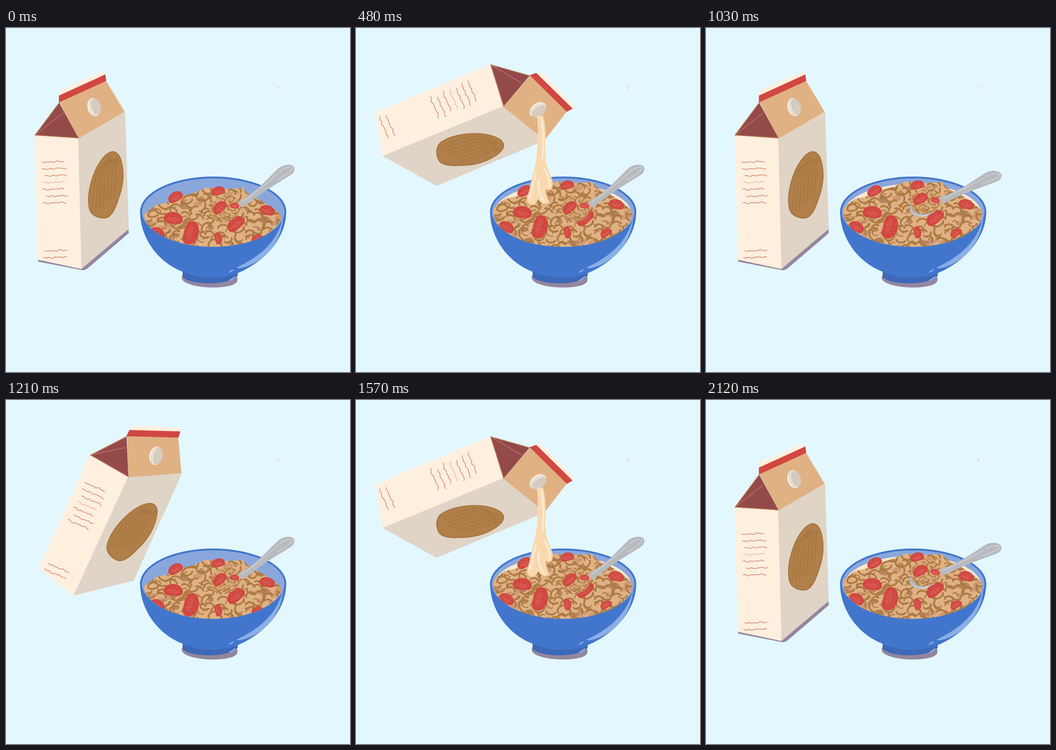
Write an HTML page that moves like this. It is 748x748 px and loops after 2180 ms.

```html
<!DOCTYPE html>
<html lang="en">
<head>
<meta charset="utf-8">
<title>Breakfast</title>
<style>
html, body { margin: 0; width: 100%; height: 100%; overflow: hidden; background: #e3f7ff; }
svg { display: block; width: 100vw; height: 100vh; }
</style>
</head>
<body>
<svg id="stage" viewBox="0 0 748 748" stroke-linecap="round" stroke-linejoin="round"></svg>
<script>
let seed = 11;
const rand = (lo = 0, hi = 1) => {
  seed = (seed * 16807) % 2147483647;
  return lo + (hi - lo) * seed / 2147483647;
};
const clamp = (v, lo = 0, hi = 1) => Math.min(hi, Math.max(lo, v));
const repeat = (count, make) => Array.from({ length: count }, (_, i) => make(i)).join('');
const shape = (d, fill, extra = '') => `<path d="${d}" fill="${fill}" ${extra}/>`;
const line = (d, color, width, extra = '') =>
  `<path d="${d}" fill="none" stroke="${color}" stroke-width="${width}" ${extra}/>`;
const oval = (x, y, rx, ry, turn, fill, extra = '') =>
  `<ellipse cx="${x}" cy="${y}" rx="${rx}" ry="${ry}" transform="rotate(${turn} ${x} ${y})" fill="${fill}" ${extra}/>`;

function scribble(row) {
  const left = rand(78, 90), width = rand(46, 56), phase = rand(0, 6), y = 291 + row * 14.85;
  const points = Array.from({ length: width / 2 }, (_, i) =>
    `${(left + i * 2).toFixed(1)} ${(y + 1.5 * Math.sin(i * 0.85) * Math.sin(i / 5 + phase) + Math.sin(i / 4)).toFixed(1)}`);
  return line('M' + points.join('L'), '#c4563f', 1.2, `opacity="${row === 3 ? 0.45 : 0.85}"`);
}

// Curled strokes on a jittered grid
function curls(x1, y1, x2, y2, step, size) {
  let d = '';
  for (let y = y1; y < y2; y += step * 0.7) {
    for (let x = x1; x < x2; x += step) {
      const a = rand(-0.9, 0.9), r = size * rand(0.7, 1.2);
      const bend = rand(0.3, 0.8) * (rand() < 0.5 ? -r : r);
      const cx = x + rand(-0.4, 0.4) * step, cy = y + rand(-0.3, 0.3) * step;
      const at = (u, v) => `${(cx + u * Math.cos(a) - v * Math.sin(a)).toFixed(1)} ${(cy + u * Math.sin(a) + v * Math.cos(a)).toFixed(1)}`;
      d += `M${at(-r, bend / 2)}C${at(-r * 0.8, -bend)} ${at(r * 0.7, -bend)} ${at(r, bend * 0.5)}`;
    }
  }
  return d;
}

function berry(x, y, turn, size = 17) {
  const seeds = repeat(12, i => {
    const a = i * 2.4, r = size * Math.sqrt((i + 0.5) / 13) * 0.85;
    return `M${(r * Math.cos(a)).toFixed(1)} ${(r * 0.6 * Math.sin(a)).toFixed(1)}l.5 .6`;
  });
  return `<g transform="translate(${x} ${y}) rotate(${turn})">` +
    `<g transform="scale(${size / 10})">` +
    shape('M-10 1.5C-10-4-4-6.3 1-6.2S10-3 10 1.5S4 6 0 6.2S-10 6-10 1.5Z', '#d14741') +
    oval(0, 1.5, 6, 2.4, 0, '#d95b53', 'opacity=".6"') + '</g>' +
    line(seeds, '#ef9f8e', 0.9) + '</g>';
}

function carton() {
  const almond = 'M230 269C240 268 247 275 251 291C257 315 255 343 245 370C238 392 230 411 216 413C203 414 185 409 181 392C177 371 181 345 190 320C199 296 215 272 230 269Z';
  const grain = repeat(7, i => {
    const x = 187 + i * 8, y = 400 - i * 5;
    return `M${x} ${y}C${x + 4} ${y - 35} ${x + 2} ${y - 60} ${x + 13 - i} ${y - 90}T${225 + i * 3} ${281 + i * 2}`;
  });
  return shape('M62 234L157 239L164 524L70 504Z', '#feefde') +
    shape('M157 239L259 182L267 437L164 524Z', '#dfd4c6') +
    shape('M116 161L217 114L258 182L158 240Z', '#e0b183') +
    shape('M63 233L116 163L158 240Z', '#944a48') +
    line('M158 239L63 233L116 162', '#bd8457', 1.7) +
    line('M64 232L124 185', '#bb7772', 1.5) +
    shape('M118 135L212 94L217 102L115 148Z', '#feefde') +
    shape('M115 147L216 101L218 115L115 162Z', '#d14741') +
    oval(191, 172, 14, 20, -15, '#f4ebdf') +
    oval(196, 171, 10, 18, -15, '#d5cbbf') +
    line('M183 156Q178 172 191 190M187 154Q182 172 195 189', '#cfc4b6', 1.3) +
    shape(almond, '#b07f4a', 'stroke="#a67139" stroke-width="2"') +
    line(grain, '#9d6c38', 1.2, 'opacity=".7"') +
    repeat(7, scribble) + scribble(13) + scribble(14);
}

function cereal() {
  const heap = 'M290 415L303 403L325 385L360 377L385 365L410 358L435 347L470 350L515 348L526 360L560 378L585 395L610 418V500H290Z';
  const patches = repeat(46, i =>
    oval(rand(305, 595) | 0, rand(360, 480) | 0, rand(7, 13) | 0, rand(4, 7) | 0, rand(-50, 50) | 0, i % 3 ? '#cf9873' : '#b98462'));
  return '<clipPath id="heap">' + shape(heap, '#000') + '</clipPath><g clip-path="url(#heap)">' +
    shape(heap, '#e0b183') + patches +
    line(curls(300, 354, 606, 490, 21, 11), '#ad7c45', 4) +
    line(curls(304, 358, 604, 488, 28, 7), '#a5733c', 2) + '</g>' +
    berry(368, 367, -28) + berry(461, 354, -12, 15) + berry(364, 413, 8, 21) +
    berry(403, 446, 107, 26) + berry(499, 425, -38, 21) + berry(568, 396, 15) +
    berry(462, 457, 80, 13) + berry(330, 445, 30) + berry(545, 458, -30, 13) + berry(472, 394, 0, 7);
}

function spoon() {
  const load = fill => oval(477, 393, 34, 28, -26, fill);
  return '<g id="scoop">' + oval(477, 401, 35, 24, -36, '#b5b6c0') +
    line('M450 422Q468 434 490 419', '#d3d7df', 2) + '</g>' +
    `<clipPath id="mound">${load('#000')}</clipPath><g clip-path="url(#mound)">` + load('#d9a877') +
    line(curls(444, 364, 514, 426, 12, 9), '#a5733c', 1.8) + '</g>' +
    shape('M504 379C530 364 545 351 560 337L590 307C600 298 613 295 623 299C630 303 628 313 620 319L575 347C550 363 535 376 514 391Z', '#b8babe') +
    line('M512 379C540 361 565 339 590 318M594 314C604 304 618 300 622 304C625 309 605 321 590 331', '#d2d7dc', 1.4) +
    berry(464, 390, -42) + berry(497, 386, 8, 10);
}

const stage = document.getElementById('stage');
stage.innerHTML = `
  <clipPath id="inside"><ellipse cx="450" cy="401" rx="151" ry="75"/></clipPath>
  <clipPath id="fall"><rect id="fallBox" x="360" width="80"/></clipPath>
  ${line('M591 133L592 129L594 129', '#c9aaa2', 1)}
  ${shape('M70 503L164 522L266 436L267 446L177 523Q170 528 163 526L70 508Z', '#94869f', 'id="shadow"')}
  <g id="carton">${carton()}</g>
  ${shape('M383 538C379 548 388 554 405 559C432 566 470 566 492 559C504 554 505 548 502 540Z', '#94869f')}
  ${shape('M384 522L384 541C400 560 485 561 504 538L503 525Z', '#3c69b8')}
  ${shape('M292 392C288 442 320 505 384 530C420 547 473 546 504 533C568 506 612 450 609 396Z', '#4276cd')}
  ${oval(450.5, 400, 157, 75, 0, '#8aa7dc', 'stroke="#4276cd" stroke-width="4"')}
  <g clip-path="url(#inside)">
    <ellipse id="milk" cx="449" cy="405" rx="150" ry="66" fill="#fbe8d0"/>
    <g id="cereal">${cereal()}</g>
  </g>
  ${shape('M603 408C594 455 563 492 503 520C499 524 510 523 522 519C570 502 601 459 603 408Z', '#8aaee6')}
  ${line('M486 531L494 526M486 549Q492 546 498 541', '#8fb5ee', 2.4)}
  <g id="spoon">${spoon()}</g>
  <g clip-path="url(#fall)">
    ${shape('M393 190L407 191C412 210 413 230 412 252C410 285 414 300 424 323C430 338 429 347 422 352Q417 353 413 350C413 362 417 370 420 379Q416 385 405 381Q399 378 396 371C394 379 389 386 382 384C374 382 370 376 372 370C378 350 381 329 387 310C394 285 399 230 393 190Z', '#fad9af')}
    ${line('M402 194C410 220 408 255 405 285M392 315C384 338 385 352 376 370M410 305C419 325 424 338 420 347M398 330C394 350 401 366 409 378', '#feefdf', 3)}
  </g>`;

const part = Object.fromEntries([...stage.querySelectorAll('[id]')].map(e => [e.id, e]));
const cycle = 1090, step = 60, returnAt = 610;

const place = (el, x, y, turn, px, py) =>
  el.setAttribute('transform', `translate(${x} ${y}) rotate(${turn}) translate(${-px} ${-py})`);

// The carton turns about the front top corner while that corner swings up and right
function tip(u) {
  const x = 157 + 163 * u * (2.5 - 2.5 * u + u * u);
  const y = 170 + 70 * (1 - u) ** 8 - 16 * u * (1 - u);
  place(part.carton, x, y, 69 * u - 30 * u * (1 - u) ** 4, 157, 240);
  part.shadow.style.display = u ? 'none' : '';
}

function lift(w) {
  place(part.spoon, 480.5 + 6.5 * w, 388 - 111.5 * w ** 1.42, 26 * w ** 0.56, 480.5, 388);
  part.scoop.style.display = w ? '' : 'none';
}

function fill(level) {
  part.milk.setAttribute('opacity', level);
  part.cereal.setAttribute('transform', `translate(${-2 * level} ${-13 * level})`);
}

function pour(top, bottom) {
  part.fallBox.setAttribute('y', top);
  part.fallBox.setAttribute('height', Math.max(0, bottom - top));
}

function draw(ms) {
  const t = ms % cycle;
  const out = Math.floor(t / step);
  const back = Math.max(0, Math.floor((t - returnAt) / step) + 1);
  tip((back ? Math.max(0, 5 - back) : Math.min(5, Math.round(out * 0.8))) / 5);
  lift(Math.min(back, 9 - back) / 4);
  fill(clamp((out - 6) / 2));
  pour(180 + 120 * back, clamp(180 + 105 * (out - 5), 180, 390));
}

const start = performance.now();
function tick() {
  draw(performance.now() - start);
  requestAnimationFrame(tick);
}
tick();
</script>
</body>
</html>
```
